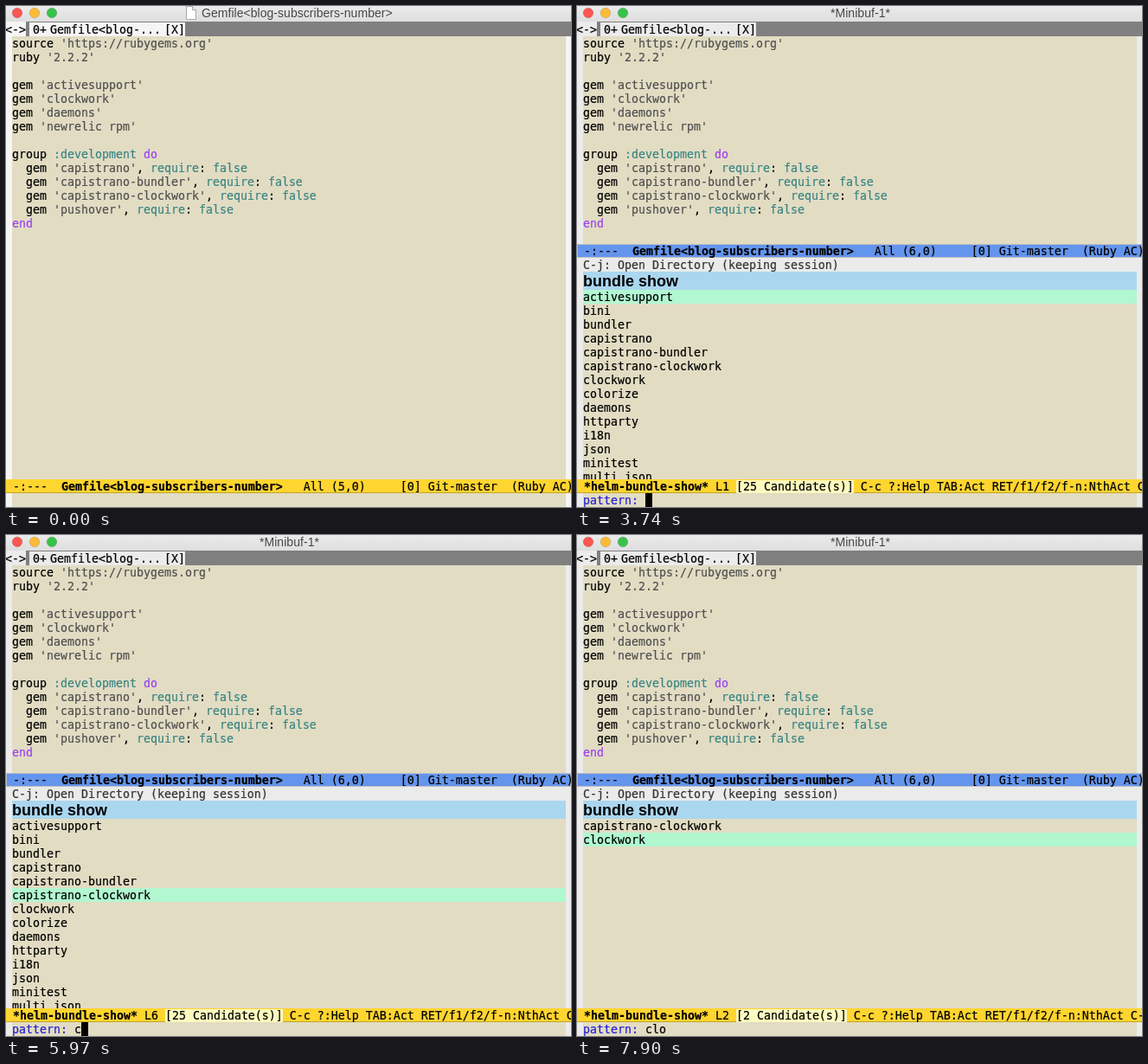
Recreate the animation shown at these times as an HTML page. Size 653 px wide and 579 px high, loop 8 s.

```html
<!DOCTYPE html>
<html lang="en">
<head>
<meta charset="utf-8">
<title>Bundle browser</title>
<style>
  html, body { margin: 0; width: 100%; height: 100%; overflow: hidden; }
  #stage {
    position: relative; width: 653px; height: 579px; overflow: hidden;
    background: var(--edge); color: #000;
    font: 13.29px/18px "DejaVu Sans Mono", monospace;
    -webkit-text-stroke: .2px;
    --edge: #f5f5f5; --paper: #e2dcc3;
  }
  #stage.helm { --edge: #ebebeb; }
  #stage div { position: absolute; white-space: pre; overflow: hidden; }
  #stage svg { position: absolute; left: 0; top: 0; }
  .title, .head { -webkit-text-stroke: 0; }
  .title { color: #474747; font: 14px/16px "Liberation Sans", Arial, sans-serif; letter-spacing: .04px; }
  .head { font: bold 18px/23px "Liberation Sans", Arial, sans-serif; }
  .active { background: #ffd530; box-shadow: inset 0 -1px rgba(60, 50, 20, .3); }
  .idle { background: #6495ed; box-shadow: inset 0 0 0 1px #bfbfbf; }
  .s { color: #505050; }
  .c { color: #3a8583; }
  .k { color: #9b42f0; }
  .p { color: #2721d2; }
  .n { background: #fcfabf; }
</style>
</head>
<body>
<div id="stage"></div>
<script>
const LOOP = 8000, ROW = 16, LEFT = 7, WIDTH = 640;
const stage = document.getElementById('stage');

// Each step overrides part of the state from its time on.
const steps = [
  [0, { helm: false, line: 5, hl: false, cursor: false, pick: 1, typed: '', query: '' }],
  [150, { cursor: true }],
  [1790, { line: 6, hl: true }],
  [2540, { cursor: false }],
  [2990, { cursor: true }],
  [3740, { helm: true, hl: false }],
  [4490, { pick: 2 }],
  [4790, { pick: 3 }],
  [4930, { pick: 5 }],
  [5230, { pick: 6 }],
  [5970, { typed: 'c' }],
  [6110, { query: 'c', pick: 1 }],
  [6410, { typed: 'cl', query: 'cl' }],
  [6710, { typed: 'clo' }],
  [7010, { cursor: false }],
  [7460, { cursor: true, pick: 2 }],
  [7900, { cursor: false }]
];

const gems = ('activesupport bini bundler capistrano capistrano-bundler capistrano-clockwork ' +
  'clockwork colorize daemons httparty i18n json minitest multi_json multi_xml net-scp ' +
  'net-ssh newrelic_rpm pushover rake sshkit thread_safe tzinfo whenever yard').split(' ');

const esc = s => s.replace(/&/g, '&amp;').replace(/</g, '&lt;').replace(/>/g, '&gt;');
const span = (cls, s) => `<span class="${cls}">${esc(s)}</span>`;
const box = (x, y, w, h, bg, html = '', cls = '', extra = '') =>
  `<div class="${cls}" style="left:${x}px;top:${y}px;width:${w}px;height:${h}px;` +
  `${bg ? `background:${bg};` : ''}${extra}">${html}</div>`;
const row = (y, html, bg) => box(LEFT, y, WIDTH, ROW, bg, html);
const modeLine = (y, cls, html) => box(0, y, 653, ROW, '', html, cls);

const file = 'Gemfile<blog-subscribers-number>';
const gem = name => 'gem ' + span('s', `'${name}'`);
const dev = name => `  ${gem(name)}, ${span('c', 'require')}: ${span('c', 'false')}`;
const code = [
  'source ' + span('s', "'https://rubygems.org'"),
  'ruby ' + span('s', "'2.2.2'"),
  '',
  ...['activesupport', 'clockwork', 'daemons', 'newrelic_rpm'].map(gem),
  '',
  `group ${span('c', ':development')} ${span('k', 'do')}`,
  ...['capistrano', 'capistrano-bundler', 'capistrano-clockwork', 'pushover'].map(dev),
  span('k', 'end')
];

function titleBar(helm) {
  const lights = ['#fb5651', '#fcbb36', '#38c24a'].map((c, i) =>
    `<circle cx="${13 + 20 * i}" cy="8" r="5.8" fill="${c}" stroke="#000" stroke-opacity=".18" stroke-width=".7"/>`).join('');
  const page = helm ? '' :
    '<path d="M208.5 .5h7l4 4v11h-11z" fill="#fff" stroke="#a9a9a9"/><path d="M215.5 .5v4h4" fill="#eee" stroke="#a9a9a9"/>';
  return box(0, 0, 653, 18, 'linear-gradient(#ebebeb, #dedede)') +
    `<svg width="653" height="18">${lights}${page}</svg>` +
    (helm ? box(0, 0, 655, 18, '', '*Minibuf-1*', 'title', 'text-align:center')
          : box(226, 0, 300, 18, '', esc(file), 'title'));
}

function tabs() {
  const label = (x, s) => box(x, 19, 140, ROW, '', esc(s));
  return box(0, 18, 653, 17, '#808080') +
    box(0, 18, 23, 17, 'var(--edge)') + box(27, 19, 180, 16, 'var(--edge)') +
    label(-1, '<->') + label(31, '0+') + label(51, 'Gemfile<blog-...') + label(183, '[X]');
}

function editor(s) {
  const end = s.helm ? 275 : 547;
  const top = n => 35 + ROW * (n - 1);
  let out = box(LEFT, 35, WIDTH, end - 35, 'var(--paper)');
  if (s.hl) out += row(top(5), '', '#eedc82');
  out += code.map((html, i) => row(top(i + 1), html)).join('');
  if (!s.helm && s.cursor)
    out += box(LEFT, top(s.line), 8, ROW, '#000', 'g', '', 'color:var(--paper)');
  return out + modeLine(end, s.helm ? 'idle' : 'active',
    ` -:---  <b>${esc(file)}</b>   All (${s.line},0)     [0] Git-master  (Ruby AC)`);
}

function picker(s) {
  const found = gems.filter(g => g.includes(s.query));
  const list = found.slice(0, 14).map((g, i) =>
    box(0, ROW * i, WIDTH, ROW, i + 1 === s.pick ? '#b1f7d0' : '', g)).join('');
  const count = span('n', `[${found.length} Candidate(s)]`);
  const out = box(LEFT, 291, WIDTH, ROW, '', 'C-j: Open Directory (keeping session)', '', 'color:#333') +
    box(LEFT, 307, WIDTH, 21, '#abd6ef', 'bundle show', 'head') +
    box(LEFT, 328, WIDTH, 219, 'var(--paper)', list) +
    modeLine(547, 'active',
      ` <b>*helm-bundle-show*</b> L${s.pick} ${count} C-c ?:Help TAB:Act RET/f1/f2/f-n:NthAct C-!:Tog`) +
    row(563, span('p', 'pattern: ') + s.typed);
  return s.cursor ? out + box(79 + 8 * s.typed.length, 563, 8, ROW, '#000') : out;
}

function draw(s) {
  stage.className = s.helm ? 'helm' : '';
  stage.innerHTML = titleBar(s.helm) + tabs() + row(563, '', 'var(--paper)') +
    editor(s) + (s.helm ? picker(s) : '');
}

const start = performance.now();
let shown = 0;

function tick() {
  const t = (performance.now() - start) % LOOP;
  const past = steps.filter(([at]) => at <= t);
  if (past.length !== shown) {
    shown = past.length;
    draw(Object.assign({}, ...past.map(([, change]) => change)));
  }
  requestAnimationFrame(tick);
}
tick();
</script>
</body>
</html>
```
